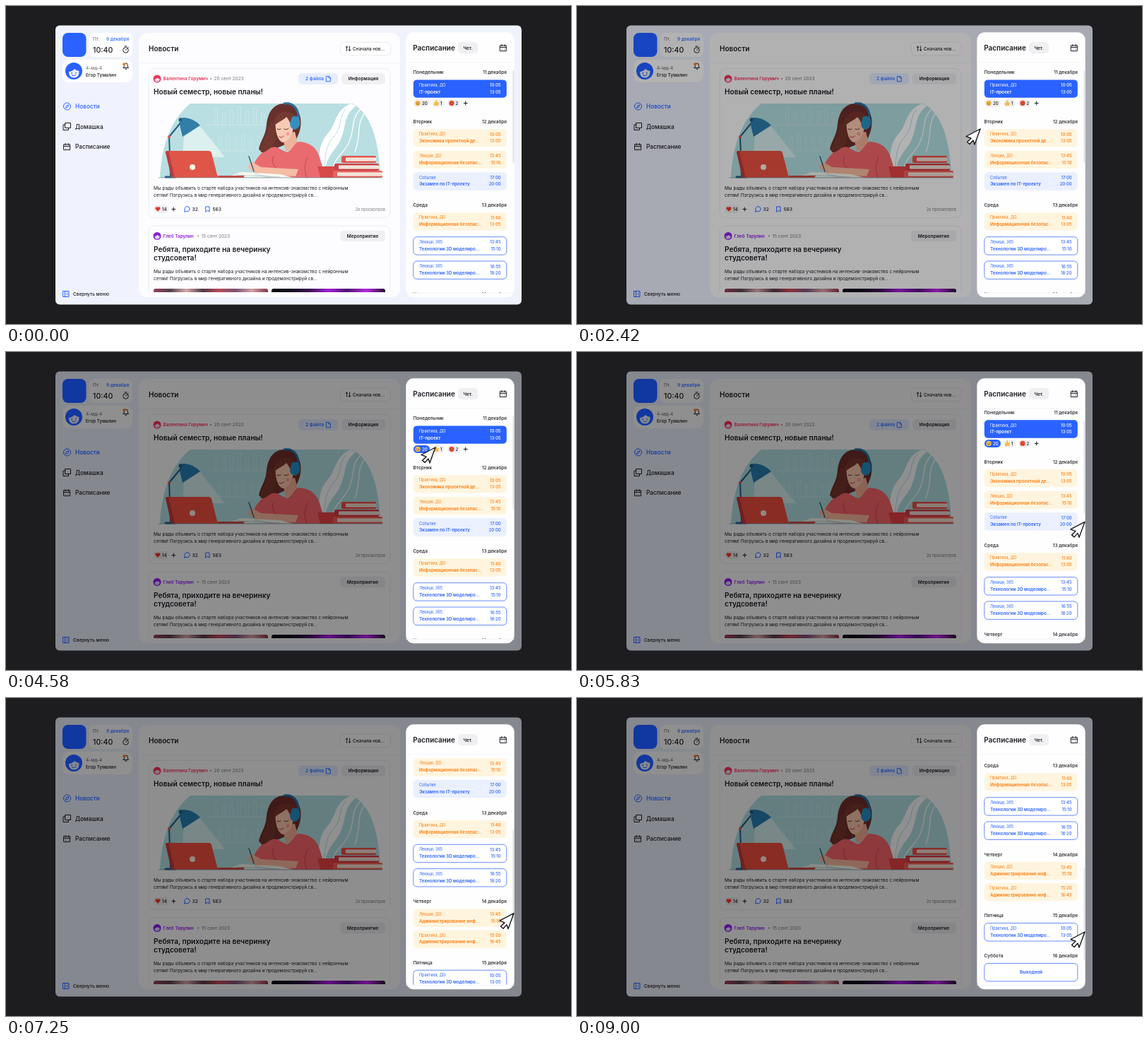
Animation of 800x450 px, one loop 9.16 s. Source, as an HTML page:

```html
<!DOCTYPE html>
<html lang="ru">
<head>
<meta charset="utf-8">
<style>
html, body { margin: 0; width: 100%; height: 100%; overflow: hidden; background: #1d1c1f; }
svg { display: block; width: 100vw; height: 100vh; }
text { font-family: Inter, "Open Sans", sans-serif; white-space: pre; }
</style>
</head>
<body>
<svg id="stage" viewBox="0 0 800 450"></svg>
<script>
const BLUE = '#2962ff', INK = '#1c1b20', GRAY = '#77777f', ORANGE = '#ff7a0a', SOFT = '#f0f0f3';

const text = (x, y, size, str, fill = INK, weight = 500, anchor = 'start') =>
  `<text x="${x}" y="${y}" font-size="${size}" fill="${fill}" font-weight="${weight}" text-anchor="${anchor}">${str}</text>`;
const box = (x, y, w, h, r, fill, stroke = 'none') =>
  `<rect x="${x}" y="${y}" width="${w}" height="${h}" rx="${r}" fill="${fill}" stroke="${stroke}" stroke-width=".9"/>`;
const dot = (x, y, r, fill) => `<circle cx="${x}" cy="${y}" r="${r}" fill="${fill}"/>`;
const shape = (d, fill) => `<path d="${d}" fill="${fill}"/>`;
const line = (d, stroke = INK, width = 1) =>
  `<path d="${d}" fill="none" stroke="${stroke}" stroke-width="${width}" stroke-linecap="round" stroke-linejoin="round"/>`;
const ring = (x, y, r, stroke, width = 1) =>
  `<circle cx="${x}" cy="${y}" r="${r}" fill="none" stroke="${stroke}" stroke-width="${width}"/>`;
const plus = (x, y) => line(`M${x - 2.5} ${y}h5M${x} ${y - 2.5}v5`);
const heart = (x, y) => shape(`M${x} ${y + 3.2}l-3-3a2 2 0 0 1 3-2.7a2 2 0 0 1 3 2.7z`, '#e8382f');

function avatar(x, y, r, color) {
  return `<g transform="translate(${x} ${y}) scale(${r / 12})">` + dot(0, 0, 12, color) +
    shape('M-7 1Q-3 1 1 -3Q4 0 7.5 0Q8 9.5 0 9.5Q-7 9.5 -7 1Z', '#eef2ff') +
    dot(-2.8, 3, .9, color) + dot(3, 2.6, .9, color) + line('M-2.5 6Q.5 7.8 3 5.6', color, 1) + '</g>';
}

function calendar(x, y, s) {
  return line(`M${x - s} ${y - s * .8}h${2 * s}v${1.8 * s}h${-2 * s}zM${x - s} ${y - s * .2}h${2 * s}` +
    `M${x - s * .5} ${y - s * 1.1}v${s * .5}M${x + s * .5} ${y - s * 1.1}v${s * .5}`) +
    dot(x - s * .4, y + s * .4, .6, INK) + dot(x + s * .4, y + s * .4, .6, INK);
}

function sidebar() {
  return box(80, 38, 33.5, 34, 8, BLUE) +
    box(117.5, 38, 61.5, 34, 8, '#fff') +
    text(123, 49.3, 6.4, 'Пт.', GRAY) + text(174, 49.3, 6.4, '9 декабря', BLUE, 500, 'end') +
    text(123, 66, 10.6, '10:40') +
    ring(169.5, 62.5, 3.8, INK) + line('M169.5 62.5l1.5-1.7M168 57h3M172.5 59l.8-.8') +
    box(80, 76, 99, 32, 9, '#fff') + avatar(96, 92, 12, BLUE) +
    text(113, 89.8, 6.4, '4-мд-4', GRAY) + text(113, 99.6, 6.3, 'Егор Тумалин') +
    line('M166 87.5h7.5l-1.2-1.7v-2.2a2.5 2.5 0 0 0-5 0v2.2zM168.8 89.3h2') + dot(167.3, 82.3, 2, ORANGE) +
    ring(86.5, 142, 5, BLUE) + line('M84.5 144l1.2-3.2 3-1-1.1 3.1z', BLUE, .9) +
    text(98, 145, 8.3, 'Новости', BLUE) +
    line('M84 165.5h7.5v7h-7.5zM84 168h-3v7.5h7.5v-3') + text(98, 173.6, 8.35, 'Домашка') +
    calendar(86.3, 199.3, 4.3) + text(98, 202, 8.35, 'Расписание') +
    line('M81 403.5h8v8h-8zM83.5 403.5v8M87.5 405.8l-1.8 1.7 1.8 1.7', BLUE) +
    text(95, 410, 6.5, 'Свернуть меню');
}

function illustration() {
  const shelf = line('M284 168H365M284 205H345M425 205H440', '#cfe8ea', 1.2) +
    Array.from({ length: 14 }, (_, i) =>
      line(`M${290 + i * 5.5} ${i % 2 ? 168 : 205}v${-16 - i * 7 % 10}h4v${16 + i * 7 % 10}`, '#cde7e9', .8)).join('');
  const back = shape('M218 243C219 214 227 165 261 138H491C515 152 528 185 530 243Z', '#b9dfe2') + shelf +
    shape('M488 138C464 149 469 166 455 181C439 200 447 216 437 243H452C450 216 464 207 472 193C484 168 476 156 496 141Z', '#fff') +
    line('M481 146C470 158 477 170 464 185C448 203 455 221 446 243', '#b9dfe2', 1) +
    line('M502 146C486 162 496 176 483 198C474 212 464 218 463 230M508 151C495 169 504 180 494 207', '#fff', 1.3);
  const lamp = shape('M252 182L274 169L310 214H250Z', '#dcf0f0') +
    line('M249 163L231 185L233 240', '#285b7d', 2) + line('M226 242h14', '#285b7d', 3) +
    shape('M245 159Q262 155 275 169L250 185Q246 172 245 159Z', '#337da9') +
    dot(231, 185, 2, '#e65646') + dot(247, 161, 2.5, '#285b7d');
  const woman =
    shape('M395 138C378 138 371 151 369 167C368 184 360 190 358 203C365 209 376 205 386 200L410 190C418 178 420 160 414 150C410 142 403 138 395 138Z', '#67302d') +
    shape('M391 181L409 178L414 198L396 206Z', '#eeb39c') +
    shape('M382 160C388 154 398 153 406 158C410 174 403 191 392 193C384 191 380 174 382 160Z', '#f8cbb5') +
    shape('M378 172C378 154 391 144 407 153C410 159 411 168 407 172C402 168 402 162 397 157C392 163 384 163 378 172Z', '#753a32') +
    line('M384 174q3 2 5 0M394 174q4 2 6-1', '#54302d', 1) + line('M387 185q4 2 6-1', '#cc4a50', 1.2) + dot(399, 181, 2.5, '#f1a092') +
    line('M394 138C407 136 415 146 414 160', '#2d709f', 3) + shape('M405 157q9-4 11 5q2 10-7 13q-7-1-7-9z', '#358fbd') +
    shape('M374 201C383 196 389 204 398 207C407 203 408 193 415 192C431 193 440 201 444 214L453 243H364L348 232C352 217 361 206 374 201Z', '#e96b70') +
    line('M379 213C374 222 381 229 388 233M427 214Q420 228 426 243', '#c94e58', 1.2) +
    shape('M373 202C360 212 358 207 363 194C369 184 370 172 376 163C382 176 387 192 373 202Z', '#713830') +
    shape('M349 221Q341 224 344 231L360 238L410 241L414 231L378 229L361 228Z', '#f5bea7') +
    line('M344 213L351 234', '#345d78', 1.4);
  const books = [[475, 212, 49, '#df554e'], [465, 223, 63, '#c9434a'], [463, 233, 70, '#e5645d']].map(([x, y, w, fill]) =>
    box(x, y, w, 10, 2, fill) + box(x + 6, y + 2.5, w - 6, 5, 1, '#f9eee4') + line(`M${x + 8} ${y + 5}h${w - 11}`, '#d5bcb3', .6)).join('');
  const desk = shape('M314 242L332 235L388 238L407 243Z', '#f9f9ef') + line('M326 239L387 242M352 238l24 4', '#abcbd0', .8) +
    shape('M228 205Q225 205 226 208L234 240Q235 243 239 243H300L291 208Q290 205 287 205Z', '#df5548') +
    shape('M226 206L230 205L239 243H234Z', '#b73d43') + shape('M300 240H338L336 243H300Z', '#c94b45') + dot(264, 228, 4, '#fff4e9') +
    shape('M441 227H467L464 243H445Z', '#d74849') + line('M466 230q9-1 6 5q-2 4-7 4', '#d74849', 2);
  return back + lamp + woman + desk + books + line('M216 243H533', '#6b8d98', .7);
}

function author(y, color, name, dateX, date, tag, tagX) {
  return avatar(214, y, 5.5, color) + text(222.5, y + 2.4, 6.4, name, color, 600) +
    dot(dateX - 4.5, y, .9, GRAY) + text(dateX, y + 2.4, 6.5, date, GRAY, 400) +
    box(tagX, y - 7.8, 537 - tagX, 15.6, 5, SOFT) + text((tagX + 537) / 2, y + 2.4, 6.5, tag, INK, 600, 'middle');
}

const paragraph = y =>
  text(209, y, 6.46, 'Мы рады объявить о старте набора участников на интенсив-знакомство с нейронным', INK, 400) +
  text(209, y + 10.1, 6.46, 'сетям! Погрузись в мир генеративного дизайна и продемонстрируй св...', INK, 400);

function news() {
  return box(188, 38, 370, 374, 12, '#fdfdff') + text(202, 64, 10, 'Новости', INK, 600) +
    box(473.5, 51.3, 71, 18.4, 6, '#fff', '#e8e8ee') +
    line('M482.5 63.5v-6.5l-1.7 1.7M482.5 57l1.7 1.7M486.5 57v6.5l-1.7-1.7M486.5 63.5l1.7-1.7', INK, .9) +
    text(491, 62.8, 6.3, 'Сначала нов...') + line('M188 80.5H558', '#f0f1f7', .8) +
    box(202, 88.5, 342, 211, 8, '#fdfdff', '#e9eaf2') +
    author(103, '#e8365d', 'Валентина Горумич', 294.5, '20 сент 2023', 'Информация', 475) +
    box(414, 95.2, 56, 15.6, 5, '#e6edff') + text(424, 105.4, 6.6, '2 файла', BLUE) +
    line('M453.7 99.5h3.6l2 2v5.3h-5.6zM457 99.7v2.2h2.2', BLUE, .9) +
    text(209, 125.3, 10.12, 'Новый семестр, новые планы!', INK, 600) + illustration() + paragraph(259.5) +
    box(209, 282, 21.5, 11, 5.5, SOFT) + heart(215, 287.5) + text(221, 289.9, 6.2, '14') + plus(237.3, 287.6) +
    line('M252.7 291l.5-2.2a3.6 3.6 0 1 1 1.8 1.8z', BLUE) + text(263.5, 290, 6.7, '32') +
    line('M283 284h5v7.2l-2.5-2-2.5 2z', BLUE) + text(292.5, 290, 6.7, '563') +
    text(537, 289.5, 5.7, '2к просмотров', GRAY, 400, 'end') +
    `<g clip-path="url(#feed)">` + box(202, 311, 342, 130, 8, '#fdfdff', '#e9eaf2') +
    author(325.5, '#8b24d8', 'Глеб Тарулин', 276.5, '15 сент 2023', 'Мероприятие', 473) +
    text(209, 348, 10.12, 'Ребята, приходите на вечеринку', INK, 600) + text(209, 360.3, 10.12, 'студсовета!', INK, 600) +
    paragraph(378) + box(209, 400, 162, 20, 3, 'url(#party)') + box(376, 400, 161, 20, 3, 'url(#night)') + '</g>';
}

const styles = {
  solid: [BLUE, '#fff', 'none'],
  warm: ['#fff5df', ORANGE, 'none'],
  cool: ['#eaf0ff', BLUE, 'none'],
  outline: ['#fff', BLUE, '#5680f2']
};

function lesson(y, style, tag, title, from, to) {
  const [fill, ink, border] = styles[style];
  return box(576.8, y, 132, 25.4, 5, fill, border) +
    text(585, y + 9.2, 5.5, tag, ink, 400) + text(585, y + 19.1, 6.25, title, ink, 600) +
    text(700.5, y + 9.5, 5.9, from, ink, 500, 'end') + text(700.5, y + 19.1, 5.9, to, ink, 500, 'end');
}

const day = (y, name, date) => text(576.5, y + 2.4, 6.5, name) + text(709, y + 2.4, 6.5, date, INK, 500, 'end');

function emoji(x, color) {
  return dot(x, 137.5, 3.7, color) + line(`M${x - 1.7} 138.5q1.7 2 3.4 0`, '#7b4326', .8) +
    dot(x - 1.4, 136.5, .5, '#563b29') + dot(x + 1.4, 136.5, .5, '#563b29');
}

function lessons() {
  const admin = 'Администрирование инф...', tech = 'Технологии 3D моделиро...', safety = 'Информационная безопас...';
  const practice = 'Практика, ДО', lecture = 'Лекция, ДО', remote = 'Лекиця, 365';
  return day(93.5, 'Понедельник', '11 декабря') +
    lesson(104.4, 'solid', practice, 'IT-проект', '10:05', '13:05') +
    `<rect id="pill" x="577" y="132" width="23" height="11" rx="5.5"/>` + emoji(583, '#f5bd4b') +
    `<text id="votes" x="589" y="139.8" font-size="6.2" font-weight="500">20</text>` +
    box(603.5, 132, 17.5, 11, 5.5, SOFT) + shape('M606 137l2-1 1-3q2 0 1 3h3l-1 5h-6z', '#f5bd4b') + text(614.7, 139.8, 6.2, '1') +
    box(625, 132, 17.5, 11, 5.5, SOFT) + emoji(631, '#ee5139') + text(636.6, 139.8, 6.2, '2') + plus(650.7, 137.5) +
    day(163.5, 'Вторник', '12 декабря') +
    lesson(174, 'warm', practice, 'Экономика проектной де...', '10:05', '13:05') +
    lesson(204.7, 'warm', lecture, safety, '13:45', '15:10') +
    lesson(235.3, 'cool', 'Событие', 'Экзамен по IT-проекту', '17:00', '20:00') +
    day(281.7, 'Среда', '13 декабря') +
    lesson(292.2, 'warm', practice, safety, '11:40', '13:05') +
    lesson(326.7, 'outline', remote, tech, '13:45', '15:10') +
    lesson(361, 'outline', remote, tech, '16:55', '18:20') +
    day(407.5, 'Четверг', '14 декабря') +
    lesson(418, 'warm', lecture, admin, '13:45', '15:10') +
    lesson(447.8, 'warm', practice, admin, '15:20', '16:45') +
    day(494, 'Пятница', '15 декабря') +
    lesson(504.6, 'outline', practice, tech, '10:05', '13:05') +
    day(550.7, 'Суббота', '16 декабря') +
    box(576.8, 561.5, 132, 25.4, 5, '#fff', '#5680f2') + text(643, 576.3, 6.3, 'Выходной', BLUE, 600, 'middle');
}

const schedule = () => box(566.3, 37.3, 153.4, 375, 11, '#fefeff') +
  text(576.3, 62.7, 9.95, 'Расписание', INK, 600) + box(640, 51, 28, 16.3, 5, SOFT) +
  text(654, 61.5, 6.4, 'Чет.', INK, 600, 'middle') + calendar(704, 59.3, 4.3) +
  `<g clip-path="url(#list)"><g id="lessons">${lessons()}</g></g>` +
  line('M566.5 79.8H719.5M566.5 406.2H719.5', '#f0f1f6', .8) +
  `<rect id="thumb" x="717.7" width="1.7" height="131" rx=".8" fill="#dcdce1"/>`;

const gradient = (id, ...colors) => `<linearGradient id="${id}">` +
  colors.map((c, i) => `<stop offset="${i / (colors.length - 1)}" stop-color="${c}"/>`).join('') + '</linearGradient>';

const stage = document.getElementById('stage');
stage.innerHTML = '<defs>' +
  gradient('party', '#9b405b', '#51404b', '#d6a9a9', '#4e3945', '#b84b57', '#765074', '#d2a3a6', '#843648') +
  gradient('night', '#08050d', '#15091e', '#391350', '#a020d4', '#4d1473', '#b52ae0', '#25102e') +
  '<clipPath id="feed"><rect x="188" y="300" width="370" height="105"/></clipPath>' +
  '<clipPath id="list"><rect x="566" y="80" width="154" height="326"/></clipPath></defs>' +
  box(0, 0, 800, 450, 0, '#1d1c1f') +
  `<g id="app">${box(70, 27.5, 660, 395, 6, '#f0f3fd')}${sidebar()}${news()}</g>` + schedule() +
  '<path id="cursor" d="M0 0L-20 10.5L-13 13.2L-18.5 18.5L-15 21.5L-10 16L-8 22Z" fill="#fff" stroke="#17171a" stroke-width="1.4" stroke-linejoin="round"/>';

const [app, list, thumb, pill, votes, cursor] =
  ['app', 'lessons', 'thumb', 'pill', 'votes', 'cursor'].map(id => document.getElementById(id));

const ease = (t, from, to) => (1 - Math.cos(Math.PI * Math.min(1, Math.max(0, (t - from) / (to - from))))) / 2;
const mix = (a, b, p) => a + (b - a) * p;
const bend = (a, b, c, p) => mix(mix(a, b, p), mix(b, c, p), p);

function pointer(t) {
  const enter = ease(t, 200, 2000), aim = ease(t, 2600, 3500), grab = ease(t, 4600, 5400), drag = ease(t, 5400, 8250);
  const x = bend(-25, 310, 571, enter) + 37 * aim + 111 * grab;
  const y = bend(385, 356, 174, enter) - 39 * aim + 100 * grab + 96 * drag;
  return `translate(${x} ${y}) rotate(${15 * (1 - ease(t, 1400, 2000))})`;
}

function draw(t) {
  const dim = ease(t, 1920, 2720), scroll = 186 * ease(t, 5420, 8513), liked = t >= 4000;
  app.style.filter = dim ? `brightness(${1 - .44 * dim}) saturate(${1 + .2 * dim})` : 'none';
  list.setAttribute('transform', `translate(0 ${-scroll})`);
  thumb.setAttribute('y', 91 + .8 * scroll);
  pill.setAttribute('fill', liked ? BLUE : SOFT);
  votes.setAttribute('fill', liked ? '#fff' : INK);
  cursor.setAttribute('transform', pointer(t));
}

// The picture advances twelve times a second; the last pose holds until the loop restarts.
const start = performance.now();
function tick() {
  const t = (performance.now() - start) % 9160;
  draw(Math.min(108, Math.floor((t + 5) * .012)) * 1000 / 12);
  requestAnimationFrame(tick);
}
tick();
</script>
</body>
</html>
```
